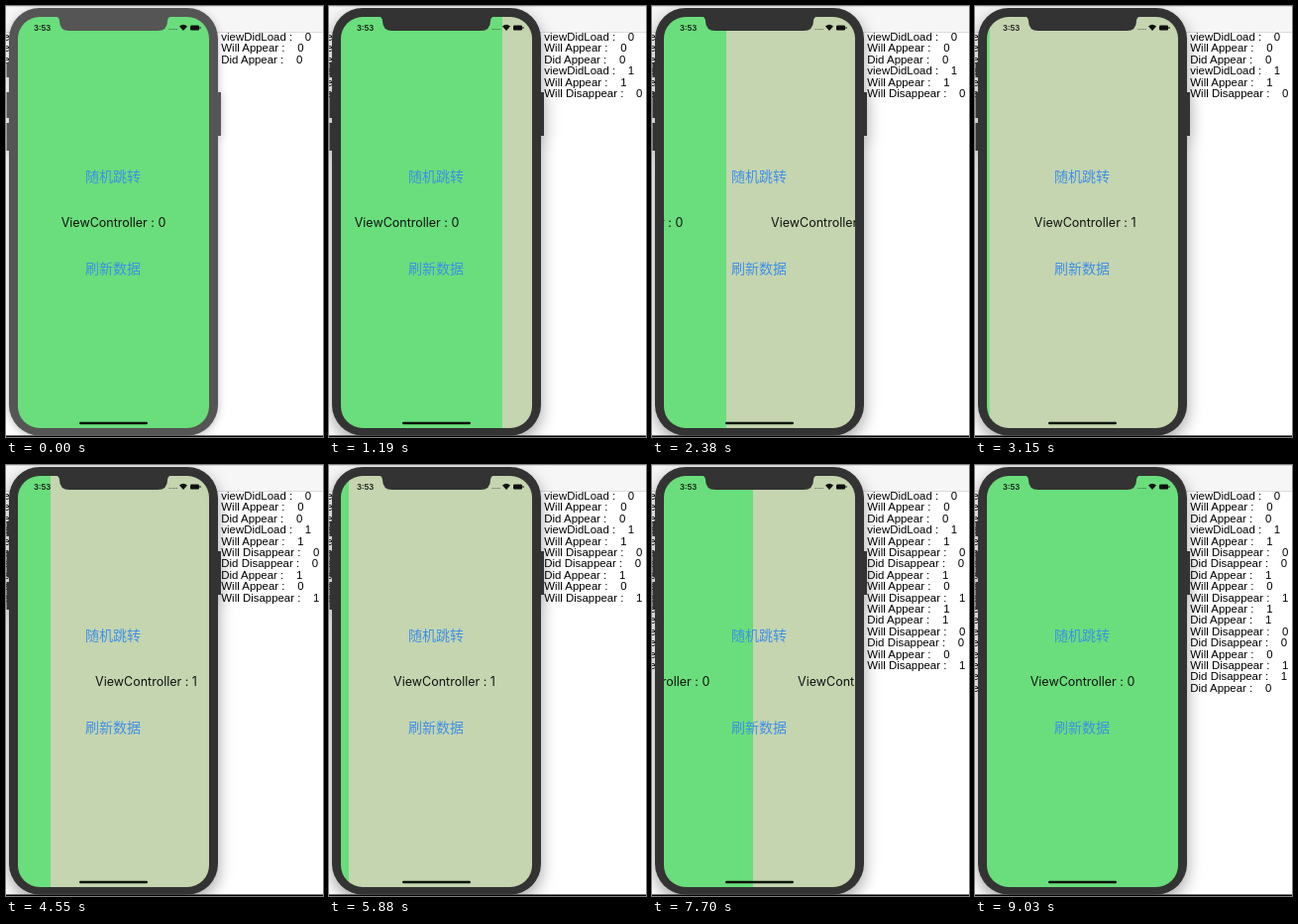
These frames come from a looping animation (320x435 px, 9450 ms). An HTML page:

```html
<!DOCTYPE html>
<html lang="zh">
<head>
<meta charset="utf-8">
<title>Page transition log</title>
<style>
  html, body { margin: 0; width: 100%; height: 100%; overflow: hidden; background: #fff; }
  svg { display: block; width: 320px; height: 435px; }
  text { white-space: pre; }
  #log { font: 11.45px "Liberation Sans", Arial, sans-serif; }
  #phone { color: #555; filter: drop-shadow(0 2px 4px rgba(0, 0, 0, .25)); }
  #phone.active { color: #333; filter: drop-shadow(0 6px 8px rgba(0, 0, 0, .36)); }
  .label { font: 12.5px Inter, Roboto, sans-serif; fill: #111; text-anchor: middle; }
  .button { font: 14px "Noto Sans CJK SC", "Noto Sans CJK", sans-serif; fill: #3f8fe6; text-anchor: middle; }
  .clock { font: 600 7.8px Inter, Roboto, sans-serif; fill: #111; }
</style>
</head>
<body>
<svg viewBox="0 0 320 435">
  <defs>
    <clipPath id="screen"><rect x="12" y="11" width="193" height="415" rx="22"/></clipPath>
  </defs>
  <rect width="320" height="26" fill="#f6f6f6"/>
  <path d="M0 .5H320M0 26.5H320" stroke="#dcdcdc"/>
  <g id="log"></g>
  <rect y="433.5" width="320" height="1.5"/>

  <g id="phone">
    <path d="M2 57V72M2 87V113M2 118V146M215.5 87V131" stroke="currentColor" stroke-width="3"/>
    <rect x="3" y="2" width="211" height="431.5" rx="31" fill="currentColor"/>
    <g clip-path="url(#screen)">
      <g id="first">
        <rect x="12" y="11" width="194" height="415" fill="#6ade7c"/>
        <text class="label" x="108.5" y="223">ViewController : 0</text>
      </g>
      <g id="second">
        <rect x="12" y="11" width="194" height="415" fill="#c5d5b0"/>
        <text class="label" x="108.5" y="223">ViewController : 1</text>
      </g>
      <text class="button" x="108" y="177">随机跳转</text>
      <text class="button" x="108" y="270">刷新数据</text>
    </g>
    <path d="M49 10Q54 11 54 15Q54 25 64 25H153Q163 25 163 15Q163 11 168 10Z" fill="currentColor"/>
    <text class="clock" x="28" y="25">3:53</text>
    <path d="M164.5 23.5H173" stroke="#222" stroke-opacity=".5" stroke-dasharray="1.5 .8"/>
    <path d="M175 20.5Q179 17 183 20.5L179 25Z" fill="#111"/>
    <rect x="186" y="19.5" width="9" height="5" rx="1.3" fill="#111"/>
    <path d="M196 21V23" stroke="#111"/>
    <rect x="74" y="419.8" width="69" height="2.4" rx="1.2" fill="#0a140c"/>
  </g>
</svg>
<script>
const LOOP = 9450, STEP = 70, LEFT = 12, RIGHT = 205;

// [ms, x of the seam between the two pages]
const seam = [
  [0, 205], [700, 205], [1190, 175], [2380, 75], [2730, 45], [2940, 23], [3080, 16], [3290, 12],
  [4060, 12], [4550, 45], [5110, 98], [5180, 98], [5880, 20], [6020, 15], [6160, 12],
  [7140, 12], [7700, 102], [8120, 172], [8330, 197], [8540, 205], [LOOP, 205]
];

// [ms, lines printed at that moment]
const events = [
  [0, "viewDidLoad 0", "Will Appear 0", "Did Appear 0"],
  [770, "viewDidLoad 1", "Will Appear 1", "Will Disappear 0"],
  [3290, "Did Disappear 0", "Did Appear 1"],
  [4130, "Will Appear 0", "Will Disappear 1"],
  [6160, "Will Appear 1", "Did Appear 1", "Will Disappear 0", "Did Disappear 0"],
  [7210, "Will Appear 0", "Will Disappear 1"],
  [8540, "Did Disappear 1", "Did Appear 0"]
];

const $ = id => document.getElementById(id);

function addText(parent, x, y, text, anchor = "start") {
  const el = document.createElementNS("http://www.w3.org/2000/svg", "text");
  el.setAttribute("x", x);
  el.setAttribute("y", y);
  el.setAttribute("text-anchor", anchor);
  el.textContent = text;
  parent.append(el);
}

const rows = events.flatMap(([time, ...lines]) => lines.map(line => ({ time, line })))
  .map(({ time, line }, i) => {
    const row = document.createElementNS("http://www.w3.org/2000/svg", "g");
    const y = 35 + i * 11.4;
    addText(row, 3.5, y, "e", "end");
    addText(row, 217.3, y, line.replace(/ (\d)$/, " :    $1"));
    $("log").append(row);
    return { time, row };
  });

function seamAt(t) {
  const i = seam.findIndex(([time]) => time > t);
  const [t0, x0] = seam[i - 1], [t1, x1] = seam[i];
  return x0 + (x1 - x0) * (t - t0) / (t1 - t0);
}

function draw(now) {
  const t = Math.floor(now % LOOP / STEP) * STEP;
  const x = seamAt(t);
  $("first").setAttribute("transform", `translate(${x - RIGHT})`);
  $("second").setAttribute("transform", `translate(${x - LEFT})`);
  $("phone").classList.toggle("active", t >= 770);
  for (const { time, row } of rows) row.style.display = t >= time ? "" : "none";
}

const start = performance.now();
function tick() {
  draw(performance.now() - start);
  requestAnimationFrame(tick);
}
tick();
</script>
</body>
</html>
```
